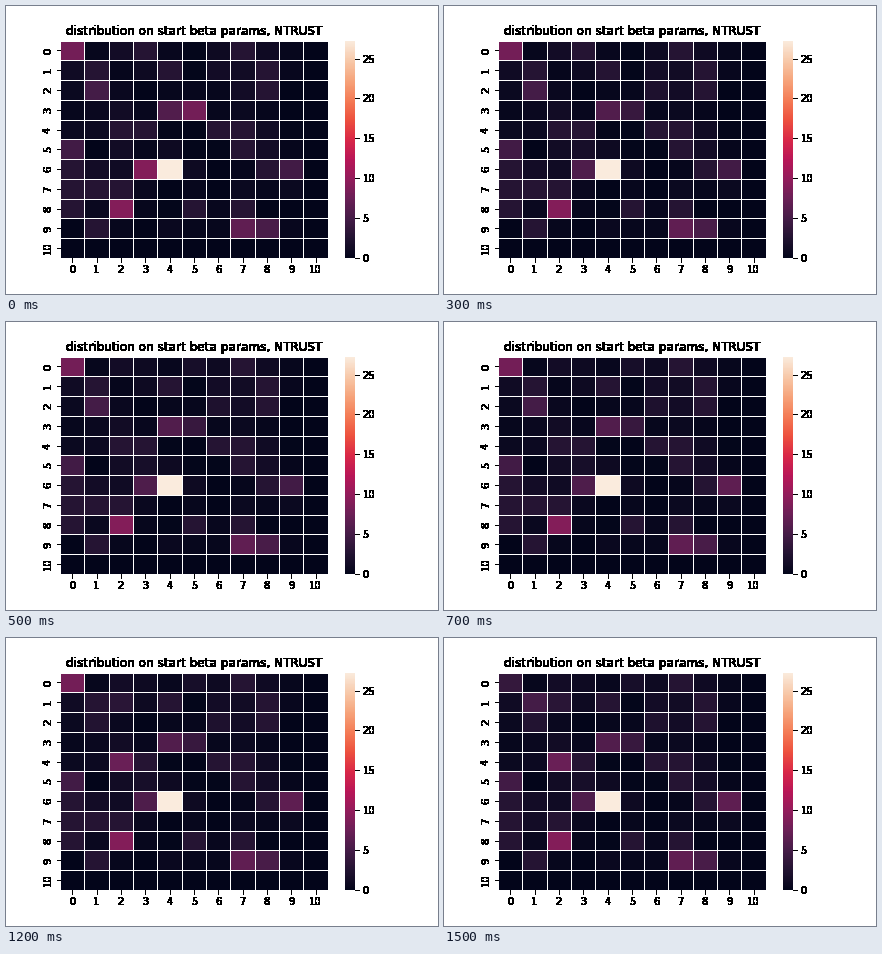
Write a matplotlib script that moves like this. It is 432 by 288 pixels and loops after 6200 ms.

```python
import numpy as np
import matplotlib.pyplot as plt
from matplotlib.animation import FuncAnimation
from matplotlib.colors import LinearSegmentedColormap

STEP_MS, LOOP_MS = 100, 6200
SIZE, VMAX = 11, 27.25

cmap = LinearSegmentedColormap.from_list("ember", [
    "#03051a", "#221331", "#451c47", "#6a1f56", "#921c5b", "#b91657",
    "#d92847", "#ed513e", "#f47c56", "#f6a47b", "#f7c9aa", "#faebdd"])

# cells that stand out at the start
PEAKS = {(0, 0): 8, (2, 1): 5, (3, 4): 5.8, (3, 5): 8, (5, 0): 4.7, (6, 3): 9,
         (6, 4): VMAX, (6, 9): 4.7, (8, 2): 9, (9, 7): 6.8, (9, 8): 5.2}

# row -> columns at the middle level
MID = 2.75
MID_COLS = {0: (3, 7), 1: (1, 4, 8), 2: (8,), 4: (2, 3, 6, 7), 5: (7,),
            6: (0, 8), 7: (0, 1, 2), 8: (0, 5, 7), 9: (1,)}

# (time in ms, row, column, new value)
EVENTS = [
    (100, 5, 3, 1.6), (100, 6, 3, 5.6),
    (300, 3, 5, 4), (300, 2, 6, 2.2),
    (400, 0, 3, 0.9),
    (500, 0, 5, 1.6),
    (700, 6, 9, 6.6),
    (1100, 2, 1, 2.5), (1100, 4, 2, 7.4),
    (1200, 1, 2, 3),
    (1400, 0, 0, 3.8), (1400, 1, 1, 4.9),
    (1500, 7, 1, 1.3),
]


def start_grid():
    """Faint noise, with an empty last row and column, under the strong cells."""
    rng = np.random.default_rng(4)
    grid = np.zeros((SIZE, SIZE))
    grid[:-1, :-1] = 1.4 * rng.random((SIZE - 1, SIZE - 1)) ** 2
    for row, cols in MID_COLS.items():
        grid[row, list(cols)] = MID
    for cell, value in PEAKS.items():
        grid[cell] = value
    return grid


def state(ms):
    grid = start_grid()
    for when, row, col, value in EVENTS:
        if when <= ms:
            grid[row, col] = value
    return grid


def solid(img, dpi):
    """Turn soft edges into full black."""
    out = np.zeros_like(img)
    out[..., 3] = img[..., 3] > 0
    return out, 0, 0


fig, ax = plt.subplots(figsize=(6, 4), dpi=72, facecolor="white")
fig.subplots_adjust(left=0.125, right=0.9, bottom=0.125, top=0.88)
mesh = ax.pcolormesh(state(0), cmap=cmap, vmin=0, vmax=VMAX,
                     edgecolors="white", linewidths=0.5)
ax.set(xlim=(0, SIZE), ylim=(SIZE, 0))
ax.spines[:].set_visible(False)

bar = fig.colorbar(mesh, ax=ax)
bar.outline.set_linewidth(0)

ticks = np.arange(SIZE)
ax.set_xticks(ticks + 0.5, ticks)
ax.set_yticks(ticks + 0.5, ticks, rotation="vertical", va="center")
ax.set_title("distribution on start beta params, NTRUST")
for artist in (ax.title, ax.xaxis, ax.yaxis, bar.ax.yaxis):
    artist.set_agg_filter(solid)


def update(i):
    mesh.set_array(state(i * STEP_MS))
    return [mesh]


anim = FuncAnimation(fig, update, frames=LOOP_MS // STEP_MS,
                     interval=STEP_MS, repeat=True, repeat_delay=0)
plt.show()
```
